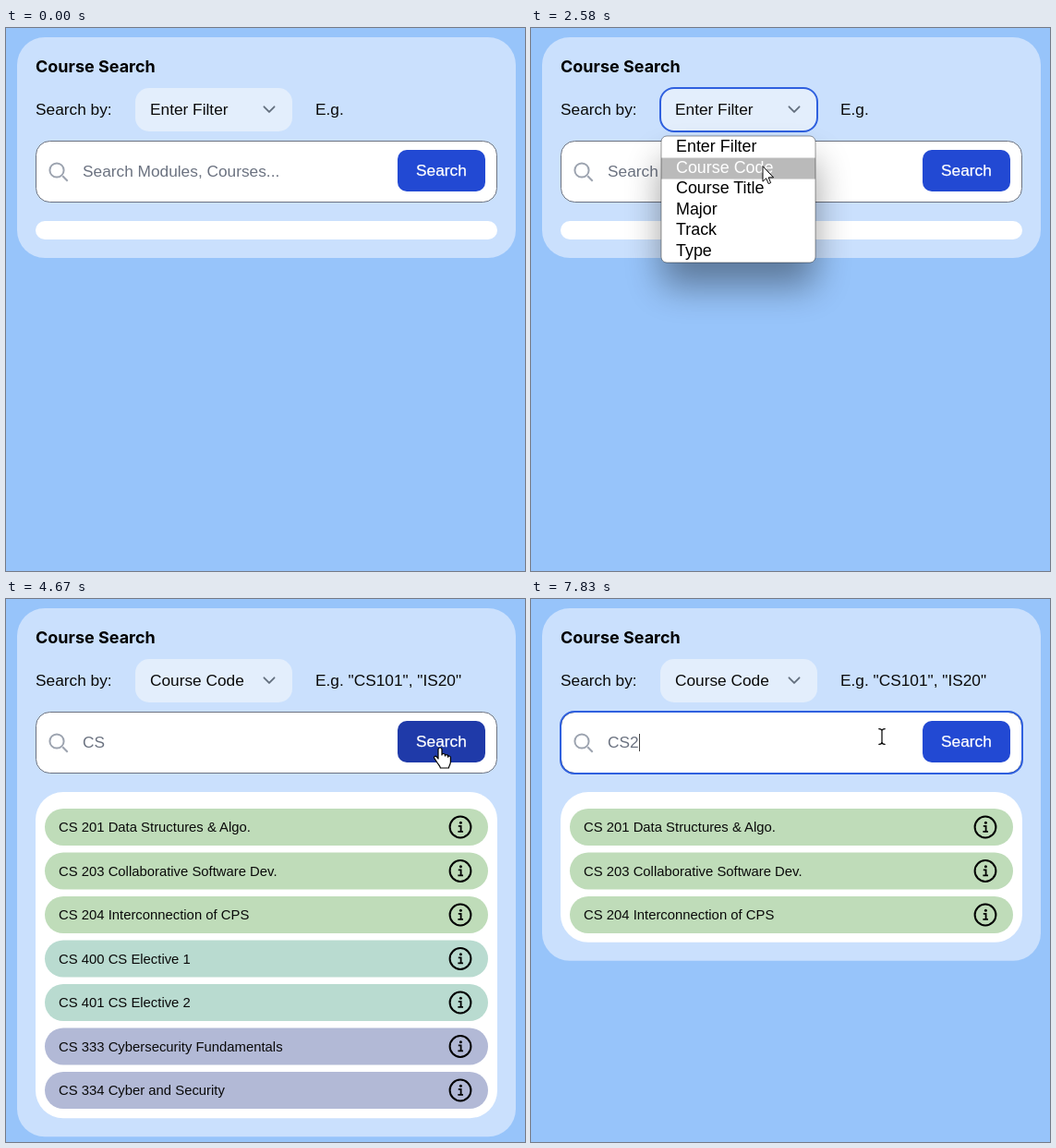
An HTML page for the animation above (8 s loop, 562 px wide and 588 px high).

```html
<!DOCTYPE html>
<html lang="en">
<head>
<meta charset="utf-8">
<title>Course Search</title>
<style>
  html, body { margin: 0; width: 100%; height: 100%; overflow: hidden; background: #97c4fa; }
  svg { position: absolute; left: 0; top: 0; display: block; }
  text { font: 17.3px "Liberation Sans", Arial, sans-serif; fill: #0a0a0a; white-space: pre; }
  .title { font: 700 18px Inter, Lato, sans-serif; fill: #000; }
  .row text { font-size: 14.85px; }
  .popup text { font-size: 17.9px; }
  .ring { fill: none; stroke: #2f60df; stroke-width: 2; }
  .cursor path { stroke-linejoin: round; stroke-linecap: round; }
</style>
</head>
<body>
<svg width="562" height="588" viewBox="0 0 562 588">
  <defs>
    <filter id="blur" x="-50%" y="-60%" width="200%" height="220%">
      <feGaussianBlur stdDeviation="19"/>
    </filter>
    <clipPath id="popClip"><rect x="141" y="117" width="167" height="137" rx="6"/></clipPath>
  </defs>
  <rect width="562" height="588" fill="#97c4fa"/>
  <rect id="card" x="12" y="10" width="540" height="239" rx="30" fill="#cae0fd"/>
  <text class="title" x="32" y="48">Course Search</text>
  <text x="32" y="94">Search by:</text>
  <rect x="140" y="65" width="170" height="47" rx="15" fill="#e3eefc"/>
  <rect id="selectRing" class="ring" x="140" y="65" width="170" height="47" rx="15"/>
  <text id="choice" x="156" y="94"></text>
  <path d="M279.5 85.3l5.5 5.6 5.5-5.6" fill="none" stroke="#64707f" stroke-width="1.9" stroke-linecap="round" stroke-linejoin="round"/>
  <text id="hint" x="335" y="94"></text>

  <rect x="32.5" y="122.5" width="499" height="66" rx="15" fill="#fff" stroke="#6b7280"/>
  <rect id="inputRing" class="ring" x="32" y="122" width="500" height="67" rx="15"/>
  <g fill="none" stroke="#9ca3af" stroke-width="2">
    <circle cx="55" cy="154" r="7.6"/><path d="M61.3 160.3l5.4 5.4"/>
  </g>
  <text id="query" x="83" y="161" fill="#6b7280" style="fill:#6b7280"></text>
  <rect id="caret" y="146" width="1" height="19" fill="#444"/>
  <rect id="button" x="424" y="132" width="95" height="45" rx="10"/>
  <text x="444" y="160" style="fill:#fff;stroke:#fff;stroke-width:.25">Search</text>

  <rect id="panel" x="32" y="209" width="500" height="20" rx="10" fill="#fff"/>
  <g id="rows"></g>

  <g id="popup" class="popup">
    <rect x="141" y="143" width="167" height="137" rx="8" fill="#000" opacity=".38" filter="url(#blur)"/>
    <rect x="141" y="117" width="167" height="137" rx="6" fill="#fff"/>
    <g clip-path="url(#popClip)"><rect id="mark" x="141" width="167" height="23" fill="#bababa"/></g>
    <rect x="141" y="117" width="167" height="137" rx="6" fill="none" stroke="#000" stroke-opacity=".4"/>
    <g id="options"></g>
  </g>

  <g id="cursor" class="cursor">
    <path id="arrow" fill="#fff" stroke="#000" d="M0 0V16.2L3.7 12.8 6.2 18.6 8.6 17.6 6.1 11.9H11.2Z"/>
    <g id="beam" fill="none">
      <path id="beamHalo" stroke="#fff" stroke-width="2.4" stroke-opacity=".75"/>
      <path id="beamLine" stroke="#000" stroke-width="1.2"/>
    </g>
    <path id="hand" fill="#fff" stroke="#000" stroke-width="1.2" d="M-2 2a2 2 0 0 1 4 0v6c0-2 3.4-2 3.4 0v1c0-2 3.2-1.8 3.2.2v1c0-1.8 2.8-1.6 2.8.4v5c0 3-2 4-2 6.4h-9c0-2-2.2-3.6-3.6-6l-3-4.6c-1-1.8 1.2-3 2.6-1.4l1.6 2z"/>
  </g>
</svg>
<script>
const LOOP = 8000, STEP = 250 / 3;
const $ = id => document.getElementById(id);
const show = (id, on) => $(id).setAttribute('visibility', on ? 'visible' : 'hidden');
const set = (id, attrs) => { for (const k in attrs) $(id).setAttribute(k, attrs[k]); };
const between = (t, a, b) => t >= a && t < b;

const options = ['Enter Filter', 'Course Code', 'Course Title', 'Major', 'Track', 'Type'];
const green = '#bfdcb9', teal = '#b9dbd0', violet = '#b2b9d6';
const courses = [
  ['CS 201 Data Structures & Algo.', green],
  ['CS 203 Collaborative Software Dev.', green],
  ['CS 204 Interconnection of CPS', green],
  ['CS 400 CS Elective 1', teal],
  ['CS 401 CS Elective 2', teal],
  ['CS 333 Cybersecurity Fundamentals', violet],
  ['CS 334 Cyber and Security', violet]
];

// Latest value whose start time has passed
const at = (table, t) => table.reduce((v, [start, val]) => t >= start ? val : v, table[0][1]);

const choice = [[0, options[0]], [2740, options[1]]];
const query = [[0, ''], [3820, 'C'], [3990, 'CS'], [6070, 'CS2']];
const found = [[0, 0], [4490, 7], [6990, 3]];
const focus = [[0, ''], [1910, 'select'], [3320, 'input'], [4490, ''], [5490, 'input'], [6990, ''], [7490, 'input']];
const caretStart = [[0, 0], [3320, 3320], [3820, 3820], [3990, 3990], [5490, 5490], [6070, 6070], [7490, 7490]];
const caretX = { '': 83, C: 95, CS: 107, CS2: 117 };

// Pointer path: time, x, y
const path = [
  [1500, 325, 1], [1667, 302, 52], [1833, 287, 88], [2250, 287, 89],
  [2417, 270, 122], [2583, 251, 150], [3000, 249.5, 152], [3083, 256, 152],
  [3333, 350, 151], [3583, 405, 149], [4000, 405, 149], [4167, 426, 149],
  [4333, 467, 159], [4417, 470, 161], [5167, 470, 161], [5333, 436, 153],
  [5500, 414, 149], [6500, 414, 149], [6667, 452, 156], [6833, 470, 161],
  [7330, 470, 161], [7500, 412, 149], [7833, 380, 149]
];

function pointer(t) {
  const i = path.findIndex(p => p[0] > t);
  if (i < 0) return path[path.length - 1].slice(1);
  if (i === 0) return path[0].slice(1);
  const [t0, x0, y0] = path[i - 1], [t1, x1, y1] = path[i];
  const k = (t - t0) / (t1 - t0);
  return [x0 + (x1 - x0) * k, y0 + (y1 - y0) * k];
}

const esc = s => s.replace('&', '&amp;');
$('rows').innerHTML = courses.map(([name, color], i) => `
  <g class="row" transform="translate(0 ${227 + i * 47.5})">
    <rect x="42" width="480" height="40" rx="20" fill="${color}"/>
    <text x="57" y="25">${esc(name)}</text>
    <circle cx="492" cy="20" r="11.4" fill="none" stroke="#000" stroke-width="2"/>
    <circle cx="492.4" cy="15.3" r="1.5"/>
    <path d="M489.8 18.8h2.8v6M489.4 24.8h5.6" fill="none" stroke="#000" stroke-width="1.8"/>
  </g>`).join('');
$('options').innerHTML = options.map((name, i) =>
  `<text x="157" y="${134.2 + i * 22.55}">${name}</text>`).join('');
const beam = 'M-3.2 -8.3Q0 -8.3 0 -6V6Q0 8.3 -3.2 8.3M3.2 -8.3Q0 -8.3 0 -6M0 6Q0 8.3 3.2 8.3';
set('beamHalo', { d: beam });
set('beamLine', { d: beam });

function draw(time) {
  const t = Math.floor((time % LOOP + 5) / STEP) * STEP;
  const [x, y] = pointer(t);
  const picked = at(choice, t), typed = at(query, t), owner = at(focus, t), n = at(found, t);

  $('choice').textContent = picked;
  $('hint').textContent = picked === options[0] ? 'E.g.' : 'E.g. "CS101", "IS20"';
  $('query').textContent = typed || 'Search Modules, Courses...';
  show('selectRing', owner === 'select');
  show('inputRing', owner === 'input');
  show('caret', owner === 'input' && (t - at(caretStart, t)) % 1000 < 495);
  set('caret', { x: caretX[typed] });

  const h = n ? 20 + n * 47.6 : 20;
  set('panel', { height: h, rx: n ? 30 : 10 });
  set('card', { height: h + 219 });
  [...$('rows').children].forEach((row, i) => row.setAttribute('visibility', i < n ? 'visible' : 'hidden'));

  const hot = y > 140 ? 1 : 0;
  show('popup', between(t, 1910, 2740));
  set('mark', { y: 118 + hot * 22.55 });
  [...$('options').children].forEach((o, i) => { o.style.fill = i === hot ? '#fff' : '#000'; });

  const kind = t < 2740 ? 'arrow' : x > 430 ? 'hand' : 'beam';
  const seen = t >= 1495;
  for (const c of ['arrow', 'beam', 'hand']) show(c, seen && c === kind);
  set('cursor', { transform: `translate(${x} ${y})` });
  set('button', { fill: kind === 'hand' ? '#1f3aa9' : '#2249d3' });
}

const begin = performance.now();
function tick() {
  draw(performance.now() - begin);
  requestAnimationFrame(tick);
}
tick();
</script>
</body>
</html>
```
